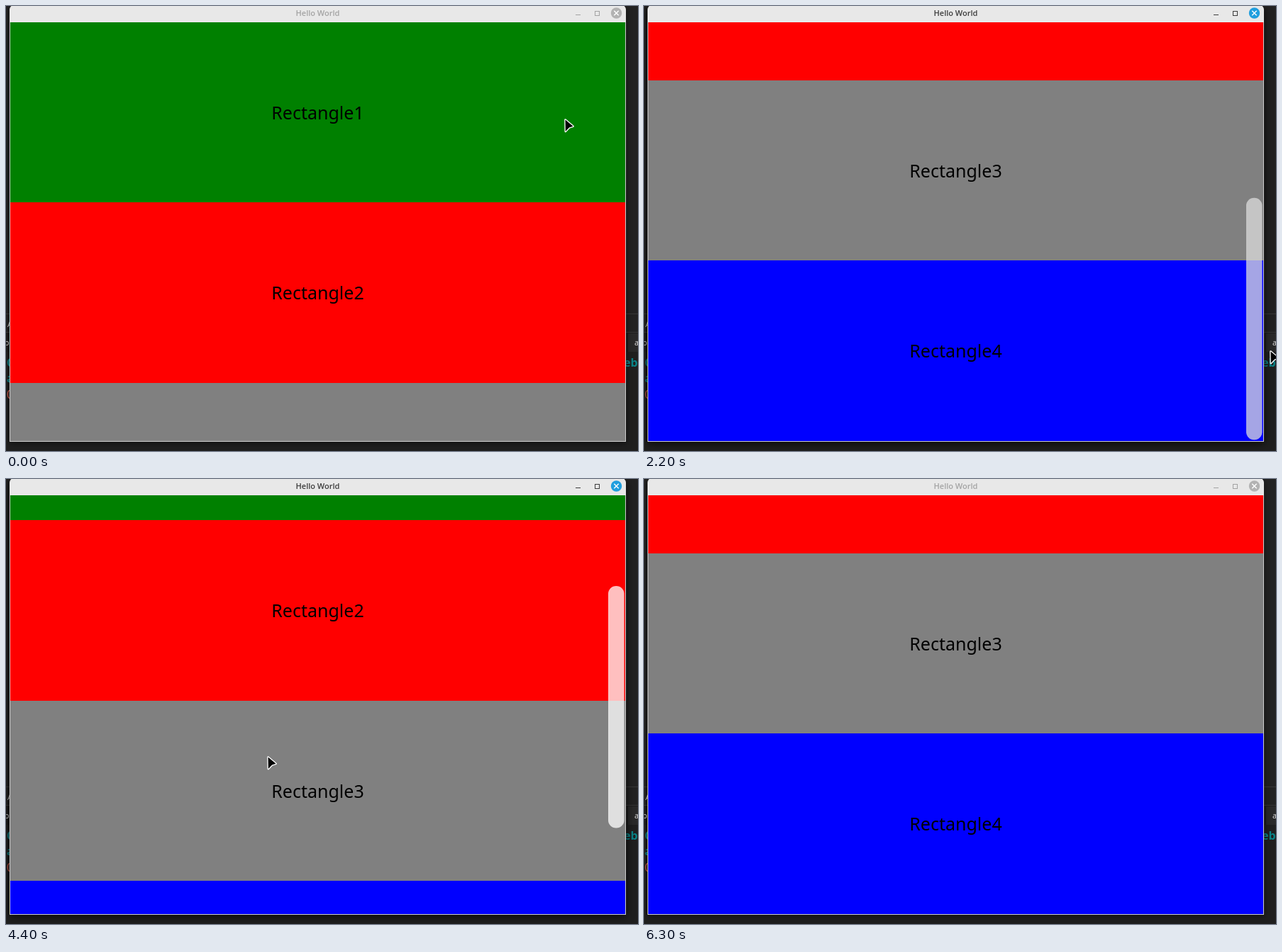
Write an HTML page with a canvas that moves like this. It is 891 px wide and 628 px high and loops after 6.4 s.

```html
<!DOCTYPE html>
<html lang="en">
<head>
<meta charset="utf-8">
<title>Hello World</title>
<style>
  html, body { margin: 0; width: 100%; height: 100%; overflow: hidden; background: #202020; }
  canvas { display: block; }
</style>
</head>
<body>
<canvas id="stage" width="891" height="628"></canvas>
<script>
const ctx = document.getElementById('stage').getContext('2d');
const LOOP = 6400, STEP = 100;
const LEFT = 6, TOP = 23, WIDTH = 867, HEIGHT = 591, CENTER = 439.5;
const COLORS = ['#008000', '#ff0000', '#808080', '#0000ff'];
const ROW = 254.5, MAX_SCROLL = 427, OVERSHOOT = 67, FLICK = 219;
const SANS = '"Noto Sans", "Open Sans", sans-serif';
const ARROW = new Path2D('M1.5 1.5L12.5 10.8L7 12.6L1.8 18Z');

// Pointer stops: time, x, y
const STOPS = [
  [0, 787, 159], [500, 859, 150], [1000, 866, 155], [1400, 877, 377], [1700, 882, 483],
  [2200, 882, 486], [2700, 871, 198], [2900, 866, 155], [3600, 211, 177],
  [3850, 230, 60], [4400, 368, 391], [4900, 182, 89], [5300, 125, 14], [5900, 53, -30]
];

const ramp = (t, from, to) => Math.min(1, Math.max(0, (t - from) / (to - from)));

function smooth(t, from, to) {
  const x = ramp(t, from, to);
  return x * x * (3 - 2 * x);
}

// Bar drag down and up, a flick, then a drag past the end that springs back
function scrollAt(t) {
  return MAX_SCROLL * (smooth(t, 1050, 1650) - smooth(t, 2203, 3018))
    + FLICK * smooth(t, 3650, 4200)
    + (MAX_SCROLL + OVERSHOOT - FLICK) * smooth(t, 4400, 4900)
    - OVERSHOOT * smooth(t, 4900, 5200);
}

const fade = (t, from, to) => .75 * ramp(t, from, from + 200) * ramp(-t, -to, 200 - to);

function pointerAt(t) {
  const next = STOPS.findIndex(stop => stop[0] > t);
  if (next < 0) return STOPS.at(-1).slice(1);
  const [t0, x0, y0] = STOPS[next - 1], [t1, x1, y1] = STOPS[next];
  const f = ramp(t, t0, t1);
  return [x0 + (x1 - x0) * f, y0 + (y1 - y0) * f];
}

function rect(x, y, w, h, color) {
  ctx.fillStyle = color;
  ctx.fillRect(x, y, w, h);
}

function text(str, x, y, font, color, align = 'left') {
  ctx.font = font;
  ctx.textAlign = align;
  ctx.fillStyle = color;
  ctx.fillText(str, x, y);
}

function drawDesktop() {
  const small = `11px ${SANS}`, bold = `bold 16px ${SANS}`;
  rect(0, 0, 891, 628, '#222222');
  rect(0, 434, 891, 1, '#383838');
  rect(0, 460, 891, 1, '#383838');
  rect(0, 461, 891, 27, '#1c1c1c');
  rect(877, 462, 14, 26, '#292929');
  rect(0, 488, 891, 140, '#1f1f1f');
  text('A', 2, 453, small, '#dddddd');
  text('op', -9, 479, small, '#dddddd');
  text('a', 886, 479, small, '#dddddd');
  text('ebu', 871, 509, bold, '#0a8387');
  text('C', 1, 509, bold, '#0a8387');
  text('a', 1, 531, bold, '#0a8387');
  text('0', 1, 554, `16px ${SANS}`, '#d9604f');
}

function drawWindow(active) {
  ctx.save();
  ctx.shadowColor = active ? 'rgba(0,0,0,.8)' : 'rgba(0,0,0,.5)';
  ctx.shadowBlur = active ? 12 : 8;
  ctx.shadowOffsetY = 2;
  ctx.fillStyle = '#e8e8e8';
  ctx.beginPath();
  ctx.roundRect(LEFT - 1, -1, WIDTH + 2, TOP + HEIGHT + 2, [6, 6, 0, 0]);
  ctx.fill();
  ctx.restore();
  rect(LEFT - 1, TOP, WIDTH + 2, HEIGHT + 1, '#cccccc');

  const ink = active ? '#3c3c3c' : '#a3a3a3';
  text('Hello World', CENTER, 14, '600 11px "Open Sans", sans-serif', ink, 'center');
  rect(803, 12, 7, 1, ink);
  ctx.lineWidth = 1;
  ctx.strokeStyle = ink;
  ctx.strokeRect(830.5, 7.5, 6, 6);
  ctx.fillStyle = active ? '#1f9ede' : '#b2b2b2';
  ctx.beginPath();
  ctx.arc(860.5, 10, 7.7, 0, 7);
  ctx.fill();
  ctx.strokeStyle = '#ffffff';
  ctx.lineWidth = 1.4;
  ctx.stroke(new Path2D('M857.3 6.8l6.4 6.4m0-6.4l-6.4 6.4'));
}

function drawContent(scroll, barAlpha, barPressed) {
  ctx.save();
  ctx.beginPath();
  ctx.rect(LEFT, TOP, WIDTH, HEIGHT);
  ctx.clip();
  rect(LEFT, TOP, WIDTH, HEIGHT, '#ffffff');
  COLORS.forEach((color, i) => {
    const y = TOP + i * ROW - scroll;
    const top = Math.floor(y), bottom = Math.floor(y + ROW);
    rect(LEFT, top, WIDTH, bottom - top, color);
    text(`Rectangle${i + 1}`, CENTER, y + 136.5, `25px ${SANS}`, '#000000', 'center');
  });
  ctx.globalAlpha = barAlpha;
  ctx.fillStyle = barPressed ? '#dcdcdc' : '#ffffff';
  ctx.beginPath();
  ctx.roundRect(849, 25 + scroll * .5755, 22.5, 341.5, 11);
  ctx.fill();
  ctx.restore();
}

function drawPointer(x, y) {
  ctx.save();
  ctx.translate(x, y);
  ctx.lineJoin = 'round';
  ctx.lineWidth = 2.6;
  ctx.strokeStyle = '#ffffff';
  ctx.stroke(ARROW);
  ctx.fillStyle = '#000000';
  ctx.fill(ARROW);
  ctx.restore();
}

const start = performance.now();

function frame() {
  const t = Math.floor((performance.now() - start) % LOOP / STEP) * STEP;
  drawDesktop();
  drawWindow(t >= 1100 && t < 6300);
  const barAlpha = fade(t, 200, 3616) + fade(t, 3650, 5800);
  drawContent(scrollAt(t), barAlpha, t >= 1100 && t < 3000);
  drawPointer(...pointerAt(t));
  requestAnimationFrame(frame);
}
frame();
</script>
</body>
</html>
```
